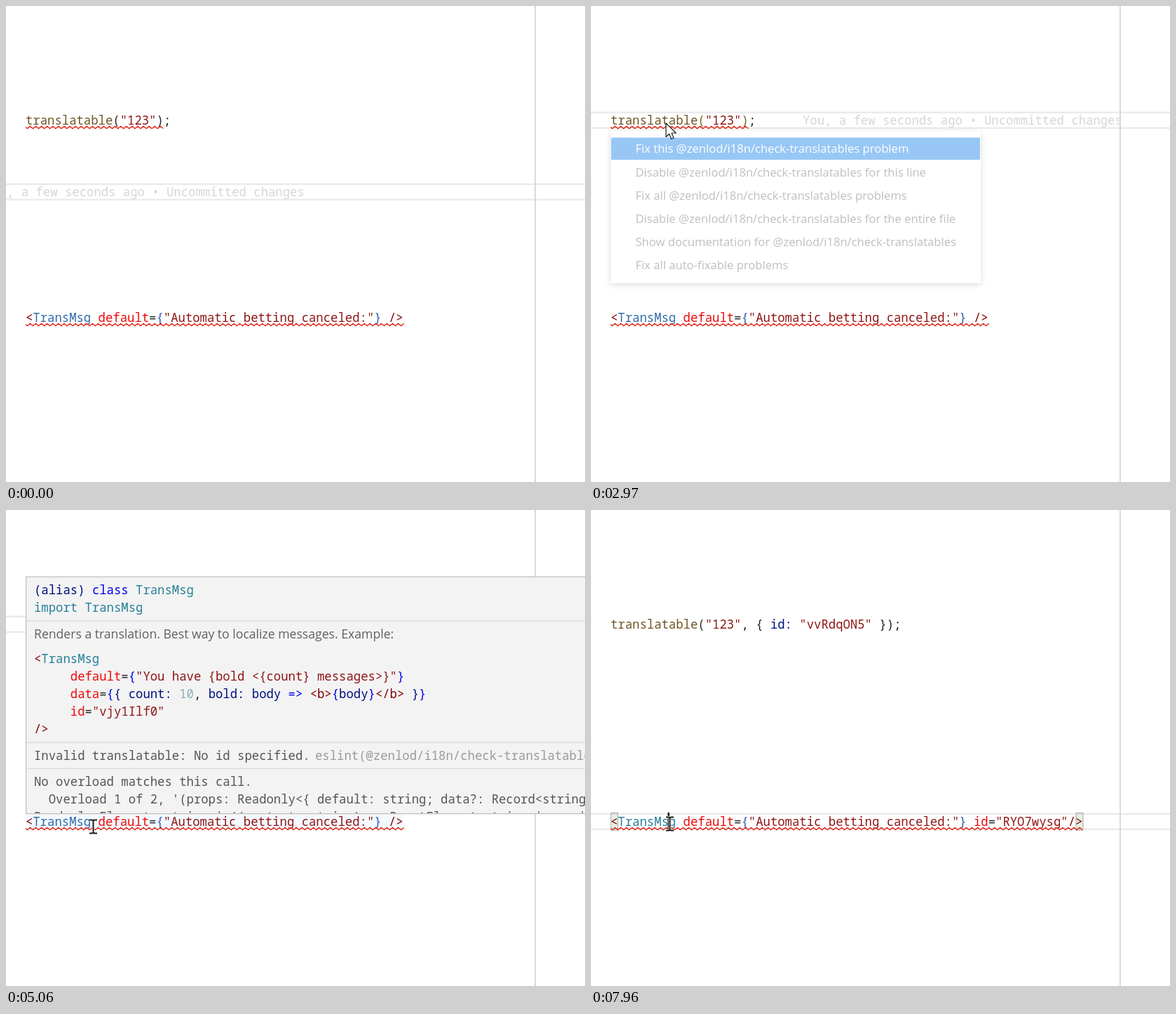
These frames come from a looping animation (826 by 678 pixels, 8000 ms). An HTML page:

```html
<!DOCTYPE html>
<html lang="en">
<head>
<meta charset="utf-8">
<title>Quick fix in the editor</title>
<style>
  html, body { margin: 0; width: 100%; height: 100%; overflow: hidden; background: #fff; }
  svg { display: block; width: 826px; height: 678px; }
  text { white-space: pre; }
  .code { font: 500 17.28px "Noto Sans Mono", monospace; fill: #222; }
  .docs { font: 17.63px "Open Sans", sans-serif; fill: #616161; }
  .item { font: 16.62px "Open Sans", sans-serif; fill: #616161; }
  .first { fill: #fff; }
  .fn { fill: #6f5526; }
  .str { fill: #8f1616; }
  .attr { fill: #ee0a0a; }
  .tag { fill: var(--tag); }
  .par { fill: var(--par); }
  .brace { fill: #2a5db0; }
  .edge { fill: #800000; }
  .type { fill: #267f99; }
  .key { fill: #0000ee; }
  .name { fill: #001080; }
  .num { fill: #86b3b8; }
  .msg { fill: #555; }
  .rule { fill: #9a9a9a; }
  .blame { fill: #d6d6d6; }
  .wave { fill: none; stroke: #e0261a; stroke-width: 1.35; }
  .menu { filter: drop-shadow(0 2px 4px rgba(0, 0, 0, .36)); }
</style>
</head>
<body>
<svg viewBox="0 0 826 678" id="stage">
  <defs>
    <clipPath id="hoverClip"><rect x="28" y="95" width="798" height="337"/></clipPath>
  </defs>
</svg>
<script>
const LOOP = 8000, LEFT = 28, CHAR = 10.368, ROW1 = 169, ROW2 = 450;
const SCOPE = "@zenlod/i18n/check-translatables";
const stage = document.getElementById("stage");
const tracks = [];

function add(parent, tag, attrs = {}) {
  const el = document.createElementNS("http://www.w3.org/2000/svg", tag);
  for (const k in attrs) el.setAttribute(k, attrs[k]);
  return parent.appendChild(el);
}
const group = (attrs, parent = stage) => add(parent, "g", attrs);
const rect = (parent, x, y, width, height, fill, more) =>
  add(parent, "rect", { x, y, width, height, fill, ...more });

// parts: class, text, class, text, ...
function line(parent, x, y, ...parts) {
  const el = add(parent, "text", { x, y, class: "code" });
  for (let i = 0; i < parts.length; i += 2)
    add(el, "tspan", { class: parts[i] }).textContent = parts[i + 1];
  return el;
}
function label(parent, x, y, cls, text) {
  add(parent, "text", { x, y, class: cls }).textContent = text;
}
// steps: time, opacity, time, opacity, ...
function track(el, ...steps) {
  tracks.push([el, steps]);
  return el;
}
function stepAt(steps, t) {
  let v = 0;
  for (let i = 0; i < steps.length && steps[i] <= t; i += 2) v = steps[i + 1];
  return v;
}

function currentRow(baseline) {
  const g = group();
  for (const dy of [-18.5, 3.6]) rect(g, 0, baseline + dy, 826, 2.5, "#ebebeb");
  return g;
}
function wave(baseline, cols) {
  const half = 4.04, end = LEFT + cols * CHAR;
  let x = LEFT + 2.4, d = `M${LEFT} ${baseline + 3.6}L${x} ${baseline + 5.6}`;
  for (let up = true; x + half < end + 1; up = !up) {
    x += half;
    d += `L${x} ${baseline + (up ? 2.3 : 5.6)}`;
  }
  return add(stage, "path", { d, class: "wave" });
}
function blame(x, y) {
  return line(stage, x, y, "blame", "You, a few seconds ago • Uncommitted changes");
}
function bracketBox(col) {
  return rect(stage, LEFT + col * CHAR + .5, 431.5, CHAR - .5, 24.5,
    "rgba(0,100,0,.1)", { stroke: "#b4b4b4", "stroke-width": 1.2 });
}
const rangeTint = (y, cols) => rect(stage, LEFT, y, cols * CHAR, 25, "rgba(173,214,255,.15)");

// Editor background
rect(stage, 0, 0, 826, 678, "#fff");
track(currentRow(271), 0, 1, 1960, 0);
track(currentRow(ROW1), 1960, 1, 6480, 0);
track(currentRow(ROW2), 6480, 1);
rect(stage, 754, 0, 1.8, 678, "#d6d6d6");
track(rangeTint(150, 19), 1160, 1, 1870, 0);
track(rangeTint(431, 52), 4980, 1, 6480, 0);
track(bracketBox(0), 6480, 1);
track(bracketBox(51), 6480, 1, 7960, 0);
track(bracketBox(64), 7960, 1);

// Code
track(blame(-30, 271), 0, 1, 1960, 0);
track(blame(302, ROW1), 2170, 1, 3500, 0);
track(blame(509, ROW1), 3500, 1, 3650, 0);

const call = ["fn", "translatable", "par", "(", "str", '"123"'];
track(line(stage, LEFT, ROW1, ...call, "par", ")", "", ";"), 0, 1, 3500, 0);
track(line(stage, LEFT, ROW1, ...call, "", ", { ", "name", "id:", "", " ", "str", '"vvRdqON5"', "", " });"),
  3500, 1);

const tag = ["edge", "<", "tag", "TransMsg", "attr", " default", "", "=", "brace", "{",
  "str", '"Automatic betting canceled:"', "brace", "}"];
track(line(stage, LEFT, ROW2, ...tag, "edge", " />"), 0, 1, 7960, 0);
track(line(stage, LEFT, ROW2, ...tag, "attr", " id", "", "=", "str", '"RYO7wysg"', "edge", "/>"), 7960, 1);

track(wave(ROW1, 19), 0, 1, 3500, 0, 3650, 1, 4280, 0);
track(wave(ROW1, 39), 3500, 1, 3650, 0);
track(wave(ROW2, 52), 0, 1, 7960, 0);
track(wave(ROW2, 65), 7960, 1);

const caret = (x, y) => rect(stage, x, y, 2.6, 25, "#111");
track(caret(99, 150), 1960, 1, 2420, 0, 2890, 1, 2970, 0, 3500, 1, 4050, 0, 4500, 1, 6480, 0);
track(caret(109.4, 431), 6480, 1, 6950, 0, 7960, 1);

// Hover panels
function panel(top, bottom, seps, clip) {
  const g = group();
  rect(g, 28.7, top + .7, 820, bottom - top - 1.4, "#f3f3f3", { stroke: "#c4c4c4", "stroke-width": 1.4 });
  for (const y of seps) rect(g, 29.4, y, 800, 1.3, "#d9d9d9");
  return [g, group(clip ? { "clip-path": `url(#${clip})` } : {}, g)];
}
function problem(g, y) {
  line(g, 40, y, "msg", "Invalid translatable: No id specified.");
  line(g, 441, y, "rule", `eslint(${SCOPE})`);
}

const [callHover, callBody] = panel(-60, 150, [62, 104]);
line(callBody, 40, 22, "name", "(alias) ", "key", "function ", "fn", "translatable", "", "(",
  "name", "default", "", ": ", "key", "string", "", "): ", "key", "string");
line(callBody, 40, 47, "type", "import translatable");
label(callBody, 40, 88, "docs", "Marks a text as translatable. Best way to localize messages.");
problem(callBody, 132);
track(callHover, 1160, .25, 1240, .5, 1320, .75, 1400, 1, 1870, 0);

const [tagHover, tagBody] = panel(94.5, 433.3, [157.4, 330.4, 367.6], "hoverClip");
line(tagBody, 40, 120, "name", "(alias) ", "key", "class ", "type", "TransMsg");
line(tagBody, 40, 145, "type", "import TransMsg");
label(tagBody, 40, 183.4, "docs", "Renders a translation. Best way to localize messages. Example:");
[
  ["edge", "<", "type", "TransMsg"],
  ["attr", "     default", "", "=", "key", "{", "str", '"You have {bold <{count} messages>}"', "key", "}"],
  ["attr", "     data", "", "=", "key", "{", "name", "{ count: ", "num", "10", "", ", ", "name", "bold: body ",
    "key", "=> ", "edge", "<b>", "key", "{", "name", "body", "key", "}", "edge", "</b>", "name", " }", "key", "}"],
  ["attr", "     id", "", "=", "str", '"vjy1Ilf0"'],
  ["edge", "/>"]
].forEach((parts, i) => line(tagBody, 40, 218 + i * 25, ...parts));
problem(tagBody, 356);
[
  "No overload matches this call.",
  "  Overload 1 of 2, '(props: Readonly<{ default: string; data?: Record<string,",
  "Readonly<Element, string | ((content: string) => ReactElement string | any | null"
].forEach((s, i) => line(tagBody, 40, 393 + i * 25, "msg", s));
track(tagHover, 4980, .5, 5060, 1, 6480, 0);

// Quick fix menus
function menu(top, items) {
  const g = group(), step = 33.2;
  const box = group({ class: "menu" }, g);
  rect(box, 28, top, 528, 17.6 + items.length * step, "#fff");
  rect(g, 28.7, top + 9.5, 526.3, 31.5, "#0074e8");
  items.forEach((s, i) =>
    label(g, 63.5, top + 31.4 + i * step, i ? "item" : "item first", s));
  return g;
}
const fixes = [
  `Fix this ${SCOPE} problem`,
  `Disable ${SCOPE} for this line`,
  `Fix all ${SCOPE} problems`,
  `Disable ${SCOPE} for the entire file`,
  `Show documentation for ${SCOPE}`,
  "Fix all auto-fixable problems"
];
track(menu(178, fixes), 2890, .08, 2970, .4, 3050, 1, 3500, 0);
track(menu(459, fixes.filter((_, i) => i !== 2)), 7420, .4, 7500, 1, 7960, 0);

// Mouse pointer
const mouse = group();
track(add(mouse, "circle", { r: 15.5, cx: -2, cy: -1, fill: "rgba(240,232,30,.72)" }),
  1960, 1, 2020, 0, 6480, 1, 6550, 0);
const beam = group({}, mouse);
const beamPath = "M-5.5 -9.5H-2Q0 -9.5 0 -7.5Q0 -9.5 2 -9.5H5.5M0 -8V8M-5.5 9.5H-2Q0 9.5 0 7.5Q0 9.5 2 9.5H5.5";
for (const [stroke, w] of [["#fff", 3.6], ["#1a1a1a", 2]])
  add(beam, "path", { d: beamPath, fill: "none", stroke, "stroke-width": w });
const outline = { fill: "#fff", stroke: "#222", "stroke-width": 1.2, "stroke-linejoin": "round" };
const arrow = add(mouse, "path", { ...outline,
  d: "M-2 -1V18.5L2.6 14.2L5.6 21.4L9 20L6 13H12.4Z" });
const hand = group({}, mouse);
add(hand, "path", { ...outline,
  d: "M-3 2Q-3 -.3 -1 -.3Q1 -.3 1 2V9Q2.5 7.4 4.2 9.4Q6 8 7.6 10.2Q10.8 9.4 10.8 12.5V18Q10.8 22 8.4 24.5V26.5H-1.5" +
     "Q-3 22.5 -6.8 18.4Q-10.4 14.8 -8.4 13.4Q-6.6 12.4 -3 16Z" });
add(hand, "path", { ...outline, fill: "none", d: "M1 9V14M4.3 9.6V14M7.6 10.4V14" });

track(mouse, 230, 1);
track(beam, 0, 1, 2890, 0, 3500, 1, 7180, 0, 7960, 1);
track(arrow, 2890, 1, 3500, 0, 7420, 1, 7960, 0);
track(hand, 7180, 1, 7420, 0);

// start, end, steps, from, to
const moves = [
  [230, 850, 8, 470, 672, 109, 168],
  [4050, 4660, 8, 109, 176, 124.5, 451],
  [6240, 6310, 1, 122, 450.5, 112.5, 447]
];
const ease = p => p * p * (3 - 2 * p);
function mouseAt(t) {
  const m = moves.filter(m => m[0] <= t).pop();
  if (!m) return [0, 0];
  const [a, b, n, x0, y0, x1, y1] = m;
  const p = ease(Math.floor(Math.min(1, (t - a) / (b - a)) * n + 1e-6) / n);
  return [x0 + (x1 - x0) * p, y0 + (y1 - y0) * p];
}

function draw() {
  const t = performance.now() % LOOP;
  for (const [el, steps] of tracks) {
    const o = stepAt(steps, t);
    el.style.display = o ? "" : "none";
    el.style.opacity = o;
  }
  mouse.setAttribute("transform", `translate(${mouseAt(t)})`);
  stage.style.setProperty("--tag", t < 6480 ? "#2f6ca8" : "#267f99");
  stage.style.setProperty("--par", t >= 1960 && t < 6480 ? "#6d6a1c" : "#2a2a2a");
  requestAnimationFrame(draw);
}
draw();
</script>
</body>
</html>
```
